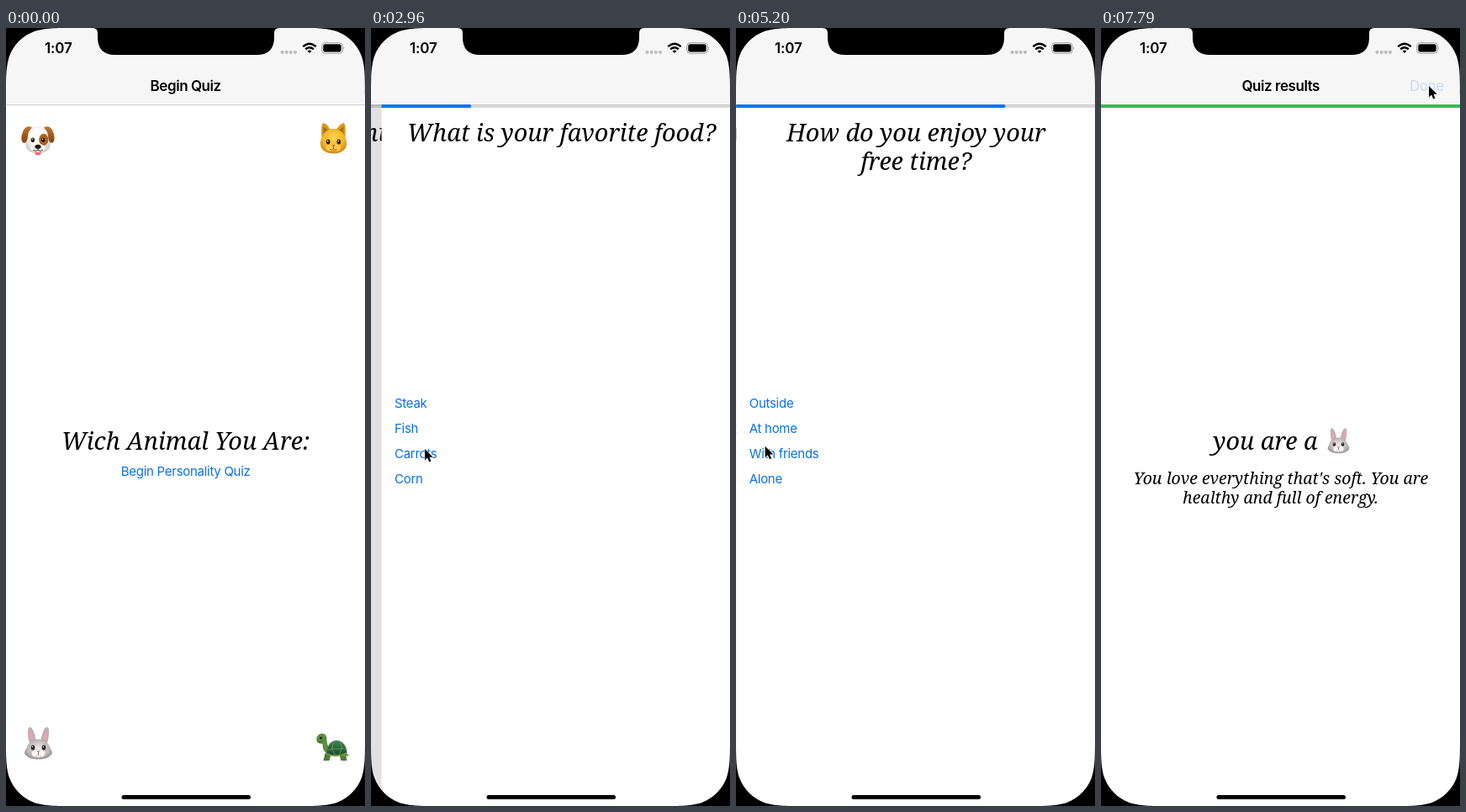
Recreate the animation shown at these times as an HTML page. Size 427x926 px, loop 7.99 s.

```html
<!DOCTYPE html>
<html lang="en">
<head>
<meta charset="utf-8">
<title>Animal quiz</title>
<style>
  html, body { margin: 0; width: 100%; height: 100%; overflow: hidden; background: #000; }
  svg { display: block; width: 100%; height: 100%; }
  .title { font: italic 28.8px "Noto Serif", serif; text-anchor: middle; }
  .note { font: italic 19.5px "Noto Serif", serif; text-anchor: middle; }
  .button { font: 15px Inter, sans-serif; letter-spacing: -.28px; fill: #0870e6; }
  .nav { font: 600 17px Inter, sans-serif; letter-spacing: -.45px; text-anchor: middle; }
  .done { font: 17px Inter, sans-serif; letter-spacing: -.45px; fill: #1579f0; }
  .clock { font: 600 17px Inter, sans-serif; letter-spacing: -.2px; }
</style>
</head>
<body>
<svg id="stage" viewBox="0 0 427 926">
  <defs>
    <radialGradient id="fur" cx=".5" cy=".4" r=".65">
      <stop offset=".45" stop-color="#fff"/><stop offset="1" stop-color="#c4c1c1"/>
    </radialGradient>
    <radialGradient id="gold" cx=".5" cy=".35" r=".7">
      <stop offset="0" stop-color="#fdd352"/><stop offset=".6" stop-color="#f3b325"/><stop offset="1" stop-color="#c87f10"/>
    </radialGradient>
    <radialGradient id="gray" cx=".5" cy=".45" r=".6">
      <stop offset="0" stop-color="#efecec"/><stop offset=".6" stop-color="#c3bcbc"/><stop offset="1" stop-color="#958d8f"/>
    </radialGradient>
    <linearGradient id="brown" x2="0" y2="1">
      <stop offset="0" stop-color="#c0742a"/><stop offset="1" stop-color="#864312"/>
    </linearGradient>
    <linearGradient id="shell" x2="0" y2="1">
      <stop offset="0" stop-color="#3f8550"/><stop offset="1" stop-color="#1a4a2c"/>
    </linearGradient>

    <g id="dog">
      <path d="M0-15.5C8-15.5 13-10 14.500-1C16 8 14 16.500 0 16.500S-16 8-14.500-1C-13-10-8-15.500 0-15.500Z" fill="url(#fur)"/>
      <ellipse cx="6.8" cy=".5" rx="5.6" ry="7.2" fill="#a9651f"/>
      <g id="flop">
        <path d="M-7-14C-12-17-16-14-18-9C-20-4-20.500 2-17.500 4C-14 5.500-12.500 1-12-4C-11.500-9-10-11-7-14Z" fill="url(#brown)"/>
      </g>
      <use href="#flop" transform="scale(-1 1)"/>
      <path d="M-3.800 13H3.800V15.500Q3.800 19 0 19T-3.800 15.500Z" fill="#f0697f"/>
      <ellipse cy="10.500" rx="9" ry="5" fill="#f4f2f1"/>
      <path d="M0 10V13M-6 12.500Q-3 15 0 13Q3 15 6 12.500" fill="none" stroke="#4b3a35"/>
      <ellipse cy="8.800" rx="3.600" ry="2.600" fill="#201918"/>
      <ellipse cx="-6.200" cy=".8" rx="2.300" ry="2.800" fill="#2b1a14"/>
      <ellipse cx="6.200" cy=".8" rx="2.300" ry="2.800" fill="#2b1a14"/>
      <circle cx="-6.700" cy="-.2" r=".7" fill="#fff"/><circle cx="5.700" cy="-.2" r=".7" fill="#fff"/>
    </g>

    <g id="cat">
      <path d="M-14-2C-15-12-14-19-12-19Q-8-18-4-12H4Q8-18 12-19C14-19 15-12 14-2Z" fill="#dd9a1c"/>
      <path d="M-12-15L-6-10L-12-5ZM12-15L6-10L12-5Z" fill="#b06a14"/>
      <path d="M0-12C9-12 14-5 15.500 3C17 12 10 17.500 0 17.500S-17 12-15.500 3C-14-5-9-12 0-12Z" fill="url(#gold)"/>
      <ellipse cx="-4" cy="10.500" rx="5" ry="4" fill="#f8c84a"/><ellipse cx="4" cy="10.500" rx="5" ry="4" fill="#f8c84a"/>
      <ellipse cx="-6.300" cy="3.500" rx="2.300" ry="2.900" fill="#35230d"/><ellipse cx="6.300" cy="3.500" rx="2.300" ry="2.900" fill="#35230d"/>
      <circle cx="-6.800" cy="2.500" r=".7" fill="#fff"/><circle cx="5.800" cy="2.500" r=".7" fill="#fff"/>
      <path d="M-2 7.500H2L0 9.500Z" fill="#9c4a35"/>
      <path d="M0 9.500V11.500M-4 12.500Q-2 14 0 11.500Q2 14 4 12.500" fill="none" stroke="#8b5511" stroke-width=".9"/>
      <path d="M-10 14L-16 16M-9 16L-14 19M10 14L16 16M9 16L14 19" stroke="#eee1bd" stroke-width=".8"/>
    </g>

    <g id="rabbit">
      <g id="ear">
        <path d="M-3-3C-3.500-10-7-20-10.500-19.500C-14-18.500-12.500-7-10.500 0Z" fill="#b9b0b2"/>
        <path d="M-5.500-4C-6.500-10-8.500-16.500-10.300-17C-12-15-11-7-9-3Z" fill="#e5a5ad"/>
      </g>
      <use href="#ear" transform="scale(-1 1)"/>
      <path d="M0-5C9-5 12 0 14 5C16 9 17.500 11 15.500 13.500C11 18 6 19 0 19S-11 18-15.500 13.500C-17.500 11-16 9-14 5C-12 0-9-5 0-5Z" fill="url(#gray)"/>
      <ellipse cx="-3.500" cy="12" rx="4.500" ry="4" fill="#f8f6f6"/><ellipse cx="3.500" cy="12" rx="4.500" ry="4" fill="#f8f6f6"/>
      <ellipse cx="-6.500" cy="5" rx="2.300" ry="2.900" fill="#2c2324"/><ellipse cx="6.500" cy="5" rx="2.300" ry="2.900" fill="#2c2324"/>
      <circle cx="-7" cy="4" r=".7" fill="#fff"/><circle cx="6" cy="4" r=".7" fill="#fff"/>
      <path d="M-2.300 9H2.300L0 11.500Z" fill="#d77c8c"/>
      <path d="M0 11V14" stroke="#806a6c"/>
      <path d="M-2 14H2V16.500H-2Z" fill="#fff" stroke="#aaa" stroke-width=".5"/>
    </g>

    <g id="turtle" fill="#5a8f40">
      <path d="M-9 8L-11 17H-4L-2 10ZM8 10L10 17H17L15 6Z" fill="#4d7d36"/>
      <path d="M14 7L20 11L13 12Z"/>
      <path d="M-5 9C-10 8-12 3-12-3C-18-3-20-6-19-10C-18-16-8-18-7-10C-7-4-6 1-2 3Z"/>
      <path d="M-7 9C-7-3-1-7 5-7C12-7 17 0 17 8Q5 14-7 9Z" fill="url(#shell)"/>
      <path d="M1-5L-1 3L3 10M9-6L11 2L8 10M-1 3H11M-6 4H-1M11 2L16 4" fill="none" stroke="#6f9f55" stroke-width=".8"/>
      <path d="M-7 9Q5 14 17 8" fill="none" stroke="#7d9a48" stroke-width="1.800"/>
      <circle cx="-14" cy="-10" r="1.600" fill="#1d2414"/>
      <path d="M-18-6Q-15-4-12-6" fill="none" stroke="#3c6a2a"/>
    </g>
  </defs>

  <rect width="427" height="926" fill="#fff"/>
  <rect width="427" height="91" fill="#f6f6f6"/>
  <path d="M0 91.500H427" stroke="#cfcfcf"/>
  <g id="pages"></g>

  <text id="begin" class="nav" x="213.700" y="75">Begin Quiz</text>
  <text id="results" class="nav" y="75">Quiz results</text>
  <text id="done" class="done" x="367" y="75">Done</text>

  <text class="clock" x="46" y="30.300">1:07</text>
  <g fill="#bdbdbd">
    <circle cx="328.500" cy="28.800" r="2.100"/><circle cx="333.700" cy="28.800" r="2.100"/>
    <circle cx="338.800" cy="28.800" r="2.100"/><circle cx="344" cy="28.800" r="2.100"/>
  </g>
  <g fill="none" stroke="#000" stroke-width="2.500">
    <path d="M353.300 22.200Q361 15.200 368.700 22.200M356.200 25.300Q361 21.200 365.800 25.300"/>
    <path d="M358.600 27.300Q361 25.600 363.400 27.300L361 29.900Z" fill="#000" stroke="none"/>
  </g>
  <rect x="375.700" y="17.700" width="24.500" height="12.500" rx="3.800" fill="none" stroke="#9b9b9b"/>
  <rect x="377.300" y="19.300" width="21.300" height="9.300" rx="2.300"/>
  <path d="M401.400 22Q403 24 401.400 26Z" fill="#9b9b9b"/>
  <rect x="137.500" y="913" width="153.500" height="5" rx="2.500"/>

  <g id="corners"></g>
  <path d="M103 0Q109 0 109 6V11Q109 32 130 32H298Q319 32 319 11V6Q319 0 325 0Z"/>

  <g id="cursor">
    <path d="M0 0V14.500L3.400 11.400L5.600 16.600L8 15.600L5.800 10.500H10.400Z" transform="scale(.93)" stroke="#fff" stroke-width="1.200" paint-order="stroke" stroke-linejoin="round"/>
  </g>
</svg>
<script>
const W = 427, H = 926, LOOP = 7990, PUSH = 540, RADIUS = 53.3;
const $ = id => document.getElementById(id);
const clamp = v => Math.min(1, Math.max(0, v));

const text = (cls, x, y, s) => `<text class="${cls}" x="${x}" y="${y}">${s}</text>`;
const icon = (id, x, y, k = 1) => `<use href="#${id}" transform="translate(${x} ${y}) scale(${k})"/>`;
const titleLines = lines => lines.map((s, i) => text('title', 214, 135 + 34 * i, s)).join('');

function question(done, lines, answers) {
  const end = W * done;
  const bar = done ? `<path d="M0 91H${end - 2}a2 2 0 0 1 0 4H0Z" fill="#0a74f0"/>` : '';
  return '<rect y="91" width="427" height="4" fill="#dadada"/><path d="M0 91.500H427" stroke="#c9c9c9"/>' + bar +
    titleLines(lines) + answers.map((s, i) => text('button', 15.5, 452 + 30 * i, s)).join('');
}

const pages = [
  icon('dog', 38, 132.5) + icon('cat', 389.5, 132) + icon('rabbit', 38.5, 851.5) + icon('turtle', 388.5, 855) +
    text('title', 213.5, 502, 'Wich Animal You Are:') +
    '<text class="button" x="213.700" y="532.500" text-anchor="middle">Begin Personality Quiz</text>',
  question(0, ['Which activities do', 'you enjoy?'], ['Swimming', 'Sleeping', 'Cuddling', 'Eating']),
  question(.25, ['What is your favorite food?'], ['Steak', 'Fish', 'Carrots', 'Corn']),
  question(.5, ['How much do you enjoy', 'car rides?'],
    ['I dislike them', 'I get a little nervous', 'I barely notice them', 'I love them']),
  question(.75, ['How do you enjoy your', 'free time?'], ['Outside', 'At home', 'With friends', 'Alone']),
  '<rect y="91" width="427" height="4" fill="#34bd5b"/>' +
    text('title', 195.5, 502, 'you are a') + icon('rabbit', 282.5, 491.5, .78) +
    text('note', 214, 543, "You love everything that's soft. You are") +
    text('note', 213.5, 566, 'healthy and full of energy.')
];

$('pages').innerHTML = pages.map(body =>
  `<g><rect y="92" width="427" height="834" fill="#fff"/>${body}<rect class="dim" y="91" width="427" height="835"/></g>`).join('');
const views = [...$('pages').children].map(el => ({
  el, dim: el.querySelector('.dim'), buttons: el.querySelectorAll('.button')
}));

// continuous-curvature screen corner for a unit radius, mirrored four times
const corner = 'M0 0V1.529C0 1.088 0 .868 .075 .631C.169 .373 .373 .169 .631 .075C.868 0 1.088 0 1.529 0Z';
$('corners').innerHTML = [[0, 0], [1, 0], [0, 1], [1, 1]].map(([r, b]) =>
  `<path d="${corner}" transform="translate(${r * W} ${b * H}) scale(${RADIUS * (1 - 2 * r)} ${RADIUS * (1 - 2 * b)})"/>`).join('');

// one tap per page: button index, touch down, touch up, start of push
const taps = [
  [0, 1060, 1150, 1244],
  [0, 2470, 2570, 2653],
  [2, 3260, 3350, 3420],
  [3, 4550, 4640, 4700],
  [1, 5695, 5770, 5812]
];

// pointer stops: time, x, y
const stops = [
  [420, 250, 600], [800, 217.5, 532], [1500, 217.5, 532], [2220, 46, 443], [2700, 46, 443],
  [2960, 64, 501], [3120, 62, 503], [3560, 62, 503], [4380, 43, 535], [4760, 43, 535],
  [5500, 30, 477], [6050, 30, 477], [6460, 64, 508], [7220, 408, 78], [7560, 390, 69]
];

// cubic-bezier(.32, .72, 0, 1)
function ease(x) {
  if (x <= 0 || x >= 1) return clamp(x);
  let lo = 0, hi = 1;
  for (let i = 0; i < 24; i++) {
    const s = (lo + hi) / 2;
    if (.96 * s * (1 - s) ** 2 + s ** 3 < x) lo = s; else hi = s;
  }
  return 2.16 * lo * (1 - lo) ** 2 + 3 * lo * lo * (1 - lo) + lo ** 3;
}

function pressed(t, down, up) {
  if (t < down) return 1;
  return t < up ? .2 : .2 + .8 * clamp((t - up) / 470);
}

function pointer(t) {
  const i = stops.findIndex(s => s[0] > t);
  if (i < 0) return stops[stops.length - 1].slice(1);
  if (i === 0) return null;
  const [a, x0, y0] = stops[i - 1], [b, x1, y1] = stops[i];
  const u = (t - a) / (b - a), k = u * u * (3 - 2 * u);
  return [x0 + (x1 - x0) * k, y0 + (y1 - y0) * k];
}

function draw(t) {
  const shown = taps.map(tap => ease((t - tap[3]) / PUSH));
  views.forEach(({ el, dim, buttons }, i) => {
    const enter = i ? shown[i - 1] : 1, leave = shown[i] || 0;
    el.setAttribute('transform', `translate(${W * (1 - enter) - .3 * W * leave} 0)`);
    el.style.display = enter > 0 && leave < 1 ? '' : 'none';
    dim.setAttribute('opacity', .12 * leave);
    if (taps[i]) buttons[taps[i][0]].setAttribute('opacity', pressed(t, taps[i][1], taps[i][2]));
  });

  const last = shown[4];
  $('begin').setAttribute('opacity', (1 - shown[0]) ** .8);
  $('results').setAttribute('x', 213.7 + 195 * (1 - last));
  $('results').setAttribute('opacity', last);
  $('done').setAttribute('opacity', last * (t < 7690 ? 1 : .2));

  const pos = pointer(t);
  $('cursor').style.display = pos ? '' : 'none';
  if (pos) $('cursor').setAttribute('transform', `translate(${pos[0]} ${pos[1]})`);
}

const start = performance.now();
function tick() {
  draw((performance.now() - start) % LOOP);
  requestAnimationFrame(tick);
}
tick();
</script>
</body>
</html>
```
